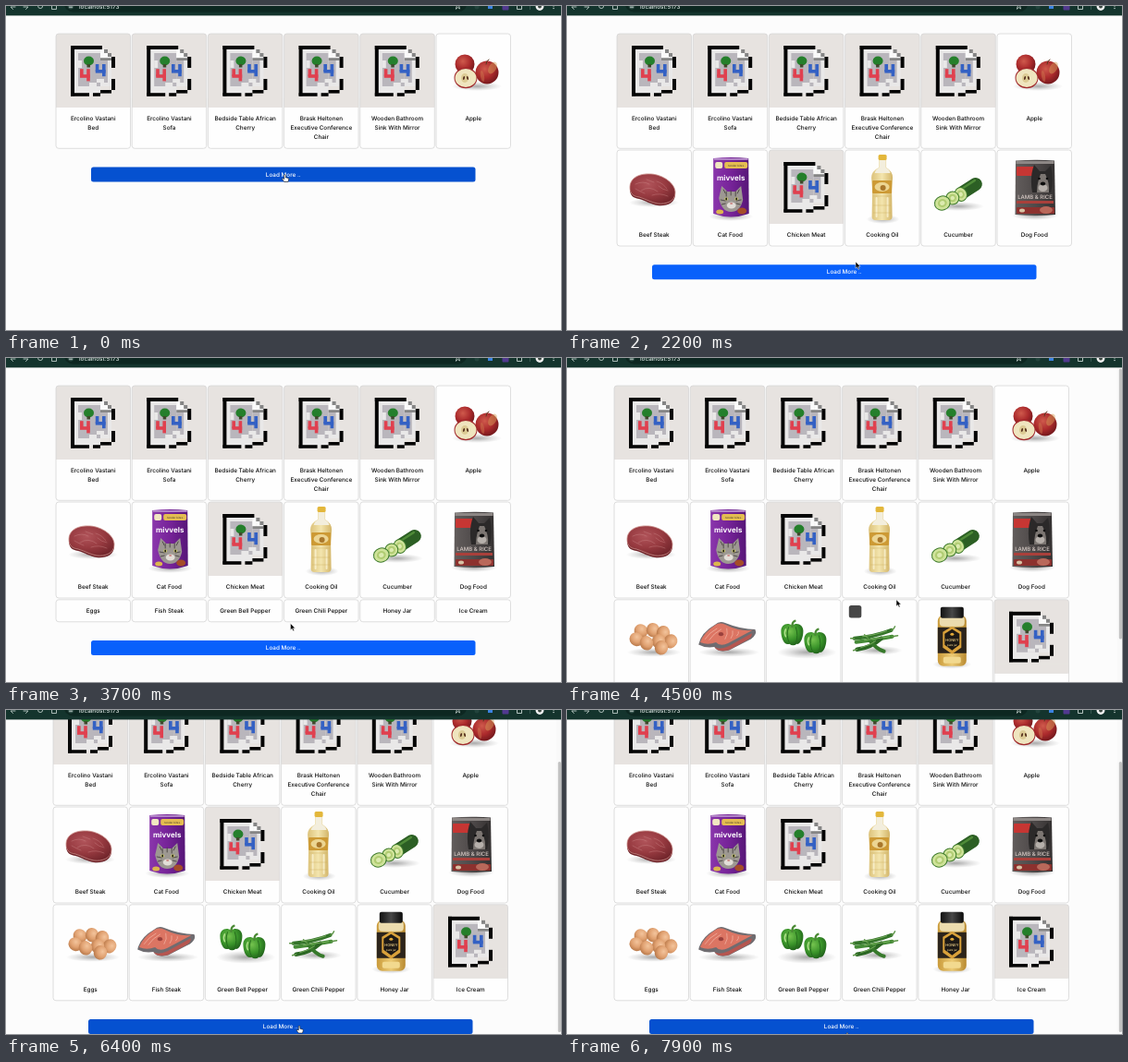
These frames come from a looping animation (600x351 px, 8000 ms). An HTML page:

```html
<!DOCTYPE html>
<html lang="en">
<head>
<meta charset="utf-8">
<title>Product list</title>
<style>
  html, body { margin: 0; width: 100%; height: 100%; overflow: hidden; background: #fcfcfc; }
  svg { display: block; width: 600px; height: 351px; }
  text { font-family: Inter, "Liberation Sans", sans-serif; font-size: 6.35px; font-weight: 500; fill: #0c0c0c; text-rendering: geometricPrecision; }
  .mid { text-anchor: middle; }
</style>
</head>
<body>
<svg id="stage" viewBox="0 0 600 351" xmlns="http://www.w3.org/2000/svg"></svg>
<script>
const CARD_W = 80.5, PITCH = 82.2, IMG_H = 80, LOOP = 8000;
const TOPS = [30, 156, 261.8];
const HEIGHTS = [124.3, 104, 104];

const rect = (x, y, w, h, fill, rx = 0, more = '') =>
  `<rect x="${x}" y="${y}" width="${w}" height="${h}" rx="${rx}" fill="${fill}" ${more}/>`;
const oval = (x, y, rx, ry, fill, turn = 0, more = '') =>
  `<ellipse cx="${x}" cy="${y}" rx="${rx}" ry="${ry}" fill="${fill}" transform="rotate(${turn} ${x} ${y})" ${more}/>`;
const path = (d, fill, more = '') => `<path d="${d}" fill="${fill}" ${more}/>`;
const line = (d, color, w) => path(d, 'none', `stroke="${color}" stroke-width="${w}" stroke-linecap="round" stroke-linejoin="round"`);
const label = (x, y, s, more = '') => `<text class="mid" x="${x}" y="${y}" ${more}>${s}</text>`;
const shade = (x, y, rx, ry = 5) => oval(x, y, rx, ry, 'url(#soft)');
const scaled = (x, y, sx, sy, art) =>
  `<g transform="translate(${x} ${y}) scale(${sx} ${sy}) translate(${-x} ${-y})">${art}</g>`;

const radial = (id, a, b, c) =>
  `<radialGradient id="${id}" cx=".4" cy=".35" r=".7"><stop stop-color="${a}"/><stop offset=".55" stop-color="${b}"/><stop offset="1" stop-color="${c}"/></radialGradient>`;
const linear = (id, a, b, c) =>
  `<linearGradient id="${id}"><stop stop-color="${a}"/><stop offset=".5" stop-color="${b}"/><stop offset="1" stop-color="${c}"/></linearGradient>`;

const defs = '<defs>' +
  '<radialGradient id="soft"><stop stop-color="#00000055"/><stop offset=".6" stop-color="#0000001c"/><stop offset="1" stop-color="#0000"/></radialGradient>' +
  radial('red', '#cf5a4c', '#ab2a2c', '#6d161a') +
  radial('egg', '#f3c49c', '#e0a171', '#b57546') +
  radial('pepper', '#74c24e', '#3a942a', '#1d5c18') +
  radial('meat', '#b0545a', '#973a40', '#74272d') +
  linear('pouch', '#8a36ac', '#762398', '#561677') +
  linear('bag', '#625d5c', '#4f4a4a', '#343131') +
  linear('oil', '#dcc27a', '#f3e5ae', '#d3b568') +
  linear('honey', '#c99a3a', '#ecca74', '#b98a30') +
  linear('lid', '#111', '#484848', '#0b0b0b') +
  '</defs>';

// Missing-picture icon on a 12 x 14 grid of 4px cells
function missing() {
  const cells = (list, fill) => list.map(([x, y, w, h]) =>
    rect(16 + x * 4, 13 + y * 4, w * 4, h * 4, fill)).join('');
  const four = (x, y, fill) => cells([[x, y, .9, 2], [x, y + 1.5, 2.7, .9], [x + 1.8, y, .9, 3.3]], fill);
  return rect(0, 0, CARD_W, IMG_H, '#e7e3e0', 2.5) + rect(0, 70, CARD_W, 10, '#e7e3e0') +
    cells([[1, 1, 7, 12], [8, 4, 3, 7]], '#e9e8e8') +
    cells([[2, 2, 6, 9], [8, 4, 2, 6]], '#b9b6bc') +
    cells([[2, 4, 1, 2], [7, 9, 2, 1], [5, 10, 2, 1]], '#e9e8e8') +
    cells([[8, 1, 1, 3], [9, 2, 1, 2], [10, 3, 1, 1]], '#fafafa') +
    cells([[9, 1, 1, 1], [10, 2, 1, 1], [8, 3.3, 3, .7]], '#858585') +
    cells([[0, 0, 8.5, 1], [0, 0, 1, 13.6], [0, 12.8, 5, .9], [6, 12.8, 2, .9],
      [11, 3, 1, 3], [11, 9, 1, 3], [8, 12, 3, .9]], '#050505') +
    oval(35.5, 29.5, 5.5, 5, '#247f2b') + rect(33.5, 33, 3.5, 3.5, '#3f4a2c') +
    four(2.5, 6.3, '#e0404f') + four(6.7, 5, '#3461c4');
}

function apple() {
  return shade(44, 57, 27) +
    oval(31, 33, 10.5, 10.5, 'url(#red)') + oval(55, 42, 12.5, 12.5, 'url(#red)') +
    oval(61, 37, 4, 7, '#d9a05a77', 30) + oval(50, 46, 2, 6, '#d07a5077', -10) +
    line('M54 33q0-4 3-5', '#5b3a22', 1) +
    oval(32, 48, 12.5, 11.2, '#a12a2d') + oval(32, 48, 11.5, 10, '#efe5bf') +
    oval(31, 48, 4, 5, '#dccb95') + oval(30, 48, 1, 2, '#5a3520', 15) + oval(34, 48, 1, 2, '#5a3520', -15);
}

function steak() {
  const d = 'M14 40C14 31 23 25 37 26C50 27 63 36 63 46C63 56 53 59 44 58C37 57 31 53 24 51C17 50 14 47 14 40Z';
  return shade(40, 57, 27) + path(d, '#6f2329', 'transform="translate(0 2)"') +
    path(d, 'url(#meat)', 'stroke="#c98c87" stroke-width=".8"') +
    line('M20 37q8-4 15 0M26 44q9-6 18 1M43 34q7 2 11 8M38 49q8-3 17 1M32 32l8 3M20 42q5 3 10 5M45 39q4 4 10 5', '#cf8d8b88', .7);
}

function catFood() {
  return shade(41, 72, 24) +
    path('M22 9Q41 7 60 9L60.500 69Q41 76 22 69Z', 'url(#pouch)') +
    rect(22.5, 9, 37, 2, '#b183c6') + rect(34, 13, 25, 7, '#e4bd51', 2) +
    label(46.5, 17.5, 'tender bites', 'style="font-size:3px;fill:#653"') +
    rect(24, 13, 8, 7, '#f1e7c1', 2) +
    label(41, 32.500, 'mivvels', 'style="font-size:8px;font-weight:700;fill:#fff"') +
    path('M28 52l3-13 6 6h9l6-6 2 15q-3 13-13 13T28 52Z', '#9d9892') +
    line('M36 45v5M41 44v5M46 45v5M30 54l5 1M52 54l-5 1M33 43l2 4M50 43l-2 4M31 59l4-1M51 59l-4-1', '#504c49', 1) +
    oval(36, 53, 2, 1.8, '#c5c269') + oval(47, 53, 2, 1.8, '#c5c269') +
    oval(36, 53, .8, 1.5, '#111') + oval(47, 53, .8, 1.5, '#111') +
    oval(41.5, 60, 5, 3.5, '#e3ded8') + oval(41.5, 58, 1.6, 1, '#c98885') +
    oval(53, 66, 5, 3.5, '#a44c28') + oval(29, 67, 4, 2.5, '#dcb54d');
}

function oil() {
  return shade(41, 75, 18) + rect(36, 5, 9, 6, '#e3b73b', 1.5) +
    path('M36.500 11h8v8q7 4 7 11l-1 14 .5 28q0 4-4 4h-14q-4 0-4-4l.5-28-1-14q0-7 8-11Z', 'url(#oil)') +
    path('M37 11h7v8q4 2 5 6h-17q1-4 5-6Z', '#f3eedd') +
    rect(29.500, 33, 21, 14, '#cd9a35', 1) + oval(40, 40, 8, 5, '#ecd592') +
    oval(41, 41, 3, 3, '#a9772b') + line('M34 52v20M46 52v20', '#fffbe0aa', 2) +
    line('M31 50h18M31 60h18M31 68h18', '#c9a85877', .8);
}

function cucumber() {
  const slice = (x, y, rx, ry) => oval(x, y, rx, ry, '#3d7a2b', -20) + oval(x, y, rx - 1, ry - 1, '#cfe39a', -20) +
    oval(x, y, rx * .55, ry * .55, '#b0cc72', -20) + oval(x, y, rx * .3, ry * .3, '#dcebb0', -20);
  return shade(40, 61, 28) + line('M45 46L59 37', '#2c5f24', 14) + line('M44 42L58 33', '#4f8b38', 2.5) +
    slice(43, 48, 7, 8) + slice(34, 52, 7.5, 7.5) + slice(23, 57.5, 9, 8);
}

function dogFood() {
  return shade(41, 71, 25) + path('M20 11.500Q41 10 62 11.500L63 70Q41 72 19.500 70Z', 'url(#bag)') +
    rect(20.5, 12, 41, 3, '#8d8785') + rect(21, 18, 21, 10, '#c63633', 1) +
    path('M38 46q-3-17 2-30l6 7h6l6-6q4 16 0 29Z', '#2b2929') +
    path('M43 46q0-10 4-20h5q5 10 4 20Z', '#7c7672') + oval(49.500, 41, 5, 4, '#b6b0ab') +
    oval(45.5, 31, 1.3, 1.3, '#0c0c0c') + oval(54, 31, 1.3, 1.3, '#0c0c0c') + oval(49.5, 36.500, 2.7, 2, '#0c0c0c') +
    label(41, 52.500, 'LAMB &amp; RICE', 'style="font-size:6px;fill:#d9cdc8"') +
    rect(21, 55, 40, 3, '#a9403b') + rect(21, 62, 41, 7, '#8c312e', 1) + oval(53, 65, 7, 4, '#b9685a') +
    oval(27, 65.500, 3, 2, '#d8c3a5');
}

function eggs() {
  const spots = [[29, 34], [42, 33], [53, 36], [24, 43], [61, 45], [48, 45], [35, 47], [51, 52]];
  return shade(43, 57, 29) + spots.map(([x, y]) => oval(x, y, 7.8, 7.2, 'url(#egg)', x * 2)).join('');
}

function salmon() {
  return shade(42, 57, 33) + scaled(9, 40, .9, .87,
    path('M9 50Q12 35 29 25Q34 20 41 23Q60 31 77 31Q80 37 72 43L46 57Q33 61 28 53Q18 55 9 50Z', '#6f6c70') +
    path('M11 47Q15 35 30 25Q35 22 41 25Q58 34 74 32L45 48Q35 53 30 47Q20 51 11 47Z', '#dc7563') +
    path('M28 53Q34 57 45 52L73 36Q73 42 68 44L45 57Q32 60 28 53Z', '#b65650') +
    line('M17 43q5-8 14-13M22 44q5-8 14-13M41 43q4-6 2-13M48 42q3-4 2-9M55 39q3-3 2-5', '#f0b09f', .9) +
    oval(36, 37, 3, 2.4, '#9a403c'));
}

function peppers() {
  const one = (x, y, s) => `<g transform="translate(${x} ${y}) scale(${s})">` +
    path('M0-9C5-13 12-10 12-3C12 4 9 12 5 11Q1 14-3 11C-9 13-12 4-12-3C-12-10-5-13 0-9Z', 'url(#pepper)') +
    line('M-4-7Q-7 2-3 10M4-7Q7 2 4 10', '#256c1d', 1) + line('M-7-5q-2 4 0 8', '#b5e391', 1.4) +
    line('M0-8q0-5 3-6', '#4b8a35', 2.4) + '</g>';
  return shade(44, 57, 32, 7) + one(28, 37, 1) + one(53, 46, 1);
}

function chilies() {
  return shade(38, 55, 27) +
    line('M13 42Q35 40 53 33', '#34742a', 4) + line('M15 46Q38 43 54 40', '#458b36', 4) +
    line('M16 54Q31 52 42 42', '#2c6824', 4.5) + line('M28 42Q37 54 45 56', '#37792b', 4) +
    line('M53 33q3-1 4-4M54 40l6-1M13 42l-4 0M16 54l-4 1M28 42l-4-4', '#5d9547', 1.4) +
    line('M22 40q15-2 26-6M24 44q14-2 27-4M20 52q9-2 16-7', '#8bbf6c', .7);
}

function honey() {
  return shade(36.500, 70, 21) + rect(21, 17, 31, 55, 'url(#honey)', 6) +
    rect(23, 18, 27, 11, '#ecdcae', 4) + rect(24, 8, 25, 12, 'url(#lid)', 2) +
    path('M21 30h31v28h-31Z', '#2c241b') + path('M36.500 29l10 6v17l-10 7-10-7V35Z', '#d9a13a') +
    path('M36.500 32l8 5v12l-8 6-8-6V37Z', '#1d1915') + oval(36.500, 37.500, 2, 1.5, '#e2aa39') +
    label(36.500, 45, 'HONEY', 'style="font-size:4px;fill:#f1d58c"') +
    label(36.500, 50, 'pure jar', 'style="font-size:3px;fill:#f1d58c"') + rect(27, 62, 19, 7, '#f2d98f', 2);
}

const ROWS = [
  [['Ercolino Vastani|Bed', missing], ['Ercolino Vastani|Sofa', missing], ['Bedside Table African|Cherry', missing],
    ['Brask Heltonen|Executive Conference|Chair', missing], ['Wooden Bathroom|Sink With Mirror', missing], ['Apple', apple]],
  [['Beef Steak', steak], ['Cat Food', catFood], ['Chicken Meat', missing],
    ['Cooking Oil', oil], ['Cucumber', cucumber], ['Dog Food', dogFood]],
  [['Eggs', eggs], ['Fish Steak', salmon], ['Green Bell Pepper', peppers],
    ['Green Chili Pepper', chilies], ['Honey Jar', honey], ['Ice Cream', missing]]
];

const card = ([name, art], col, h) => `<g transform="translate(${54 + col * PITCH} 0)">` +
  rect(0, 0, CARD_W, h, '#fefefe', 3, 'class="box"') + `<g class="art">${art()}</g><g class="name">` +
  name.split('|').map((s, i) => label(CARD_W / 2, 14.4 + i * 10, s)).join('') + '</g>' +
  rect(0, 0, CARD_W, h, 'none', 3, 'class="box" stroke="#d6d6d6" stroke-width=".8"') + '</g>';

const rowsMarkup = ROWS.map((row, r) =>
  `<g class="row" transform="translate(0 ${TOPS[r]})">${row.map((c, i) => card(c, i, HEIGHTS[r])).join('')}</g>`).join('');

const toolbar = rect(0, 0, 600, 10.4, '#14342d') + rect(63, -12, 435, 18.5, '#0d2721', 9) +
  line('M10 1H5l2.5 2.5M19 1h5l-2.5 2.5', '#b9c9c4', .9) +
  line('M34.5 0a2.6 2.6 0 0 0 5.2 0M49.5-1v4.5h5V-1', '#b9c9c4', .9) +
  oval(70, 0, 3.4, 3.4, '#2c4a43') + line('M68.5 0h3M68.5 1.6h3', '#d5e0dc', .7) +
  '<text x="79" y="2.6" style="fill:#d9e3e0">localhost:5173</text>' +
  line('M486.5 3l2-1.4 2 1.4-.7-2.6M486.5 3l.7-2.6', '#c9d6d2', .8) +
  oval(509, 1, 2.5, 2.5, '#22433c') + rect(521, -2, 5, 5, '#3b82e0') +
  rect(536.5, -3, 7, 7.500, '#51398f', 1) +
  line('M552.5-1v4.5h5V-1', '#c9d6d2', .9) + rect(566, 0, .7, 4, '#4a6a62') +
  oval(577, 0, 4.5, 5, '#f1f1f1') + oval(577, 0, 2, 2.5, '#39453f') +
  oval(592, 0, .7, .7, '#dbe5e1') + oval(592, 2.5, .7, .7, '#dbe5e1');

const arrow = path('M0 0V7.2L1.7 5.7 2.9 8.3 4.1 7.8 3 5.2H5.2Z', '#050505', 'stroke="#fff" stroke-width=".5"');
const hand = path('M-.8.5Q0-.4.8.5V3.2L3.6 4Q4.4 4.3 4.2 5.4L3.4 8H-.7L-2.8 5.2Q-3 4.2-1.9 4.3L-.8 5Z',
  '#fff', 'stroke="#111" stroke-width=".6"');

const stage = document.getElementById('stage');
stage.innerHTML = defs + rect(0, 0, 600, 351, '#fcfcfc') +
  `<g id="page">${rowsMarkup}` +
  `<g id="more">${rect(92, 0, 415.5, 16, '#0860fb', 2.5, 'id="fill"')}` +
  `${label(299.8, 10.3, 'Load More ..', 'style="fill:#fff"')}</g>` +
  rect(307.8, 268, 13.5, 13.5, '#474747', 2.5, 'id="badge"') + '</g>' +
  `<g id="bar">${rect(594.5, 10, 5.5, 341, '#f9f9f9')}${rect(596.8, 0, 3.2, 293, '#c2c2c2', 1.6, 'id="thumb"')}</g>` +
  toolbar + `<g id="arrow">${arrow}</g><g id="hand">${hand}</g>`;

const get = id => document.getElementById(id);
const page = get('page'), more = get('more'), fill = get('fill'), badge = get('badge'), bar = get('bar'), thumb = get('thumb');
const pointers = { arrow: get('arrow'), hand: get('hand') };
const rows = [...document.querySelectorAll('.row')].map(g => ({
  g, boxes: g.querySelectorAll('.box'), art: g.querySelectorAll('.art'), names: g.querySelectorAll('.name')
}));
const show = (el, on) => el.setAttribute('display', on ? 'inline' : 'none');
const move = (el, x, y) => el.setAttribute('transform', `translate(${x} ${y})`);
const ease = k => k * k * (3 - 2 * k);
const clamp = k => Math.max(0, Math.min(1, k));

// When each row appears, and when its pictures arrive
const LISTED = [0, 900, 3600];
const LOADED = [0, 1100, 4000];
const SCROLL = { from: 4500, to: 4900, by: 51 };
const TRAIL = [
  [0, 301.5, 182.5], [900, 301.5, 182.5], [1300, 305, 212], [2000, 312, 277], [2300, 312, 277],
  [2700, 310, 288], [3500, 309, 289], [3700, 307.5, 287.5], [4300, 356, 261.8], [5000, 356, 261.8],
  [5300, 350, 294], [5800, 318, 342], [6500, 317, 342], [7500, 305, 347], [7900, 303, 349.5]
];

function pointerAt(t) {
  const i = TRAIL.findIndex(p => p[0] > t);
  if (i < 0) return TRAIL[TRAIL.length - 1].slice(1);
  const [a, ax, ay] = TRAIL[i - 1], [b, bx, by] = TRAIL[i];
  const k = ease((t - a) / (b - a));
  return [ax + (bx - ax) * k, ay + (by - ay) * k];
}

function draw(t) {
  let bottom = 0;
  rows.forEach((row, r) => {
    const listed = t >= LISTED[r], loaded = t >= LOADED[r];
    const gap = loaded ? IMG_H : 0;
    const h = HEIGHTS[r] - IMG_H + gap;
    show(row.g, listed);
    row.boxes.forEach(b => b.setAttribute('height', h));
    row.art.forEach(a => show(a, loaded));
    row.names.forEach(n => move(n, 0, gap));
    if (listed) bottom = TOPS[r] + h;
  });

  const tall = t >= LOADED[2];
  const k = ease(clamp((t - SCROLL.from) / (SCROLL.to - SCROLL.from)));
  const left = tall ? -3 : 0, scroll = SCROLL.by * k;
  const top = bottom + 20.2;
  move(page, left, -scroll);
  move(more, 0, top);
  show(bar, tall);
  thumb.setAttribute('y', 11.5 + 44.5 * k);

  const [x, y] = pointerAt(t);
  const px = x - left, py = y + scroll;
  const over = px > 92 && px < 507 && py >= top && py <= top + 16;
  const onChili = px > 300.6 && px < 381 && py > 261 && py < 341;
  show(badge, tall && onChili);
  fill.setAttribute('fill', over ? '#0551d0' : '#0860fb');
  show(pointers.arrow, !over);
  show(pointers.hand, over);
  move(over ? pointers.hand : pointers.arrow, x, y);
}

const start = performance.now();
function tick() {
  const t = (performance.now() - start) % LOOP;
  draw(Math.floor(t / 100) * 100);
  requestAnimationFrame(tick);
}
tick();
</script>
</body>
</html>
```
